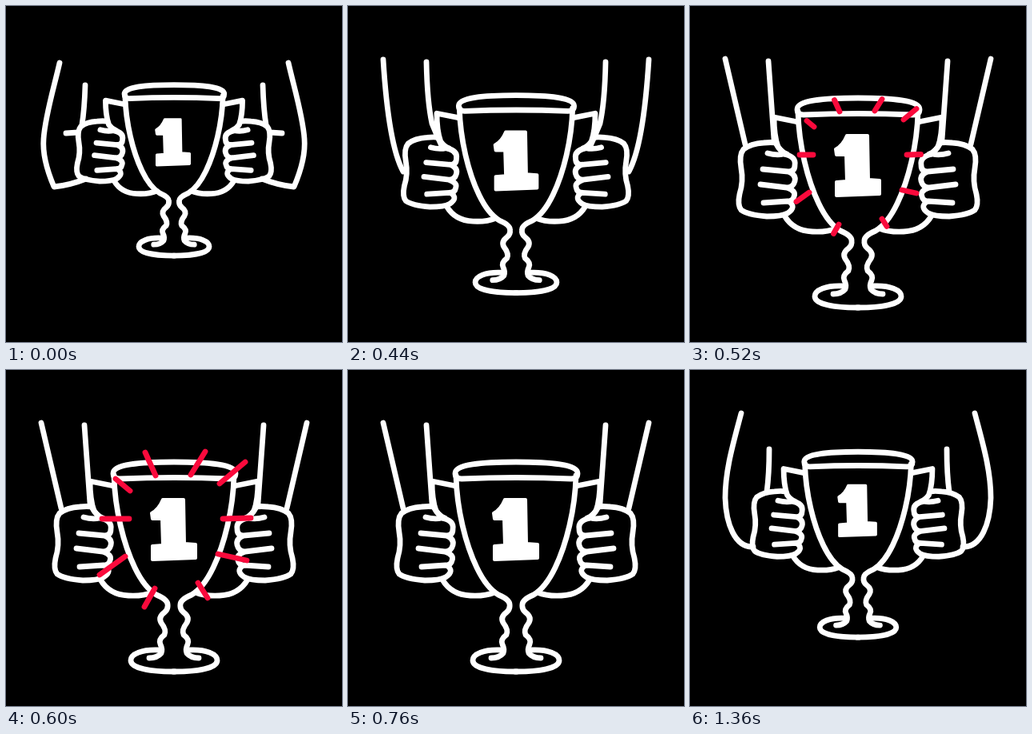
An HTML page for the animation above (1.4 s loop, 420 by 420 pixels).

```html
<!DOCTYPE html>
<html lang="en">
<head>
<meta charset="utf-8">
<title>Trophy</title>
<style>
  html, body { margin: 0; width: 100%; height: 100%; overflow: hidden; background: #000; }
  svg { display: block; width: 100%; height: 100%; }
</style>
</head>
<body>
<svg viewBox="0 0 420 420" fill="none" stroke="#fff" stroke-width="6.8" stroke-linecap="round" stroke-linejoin="round">
  <defs>
    <g id="half">
      <!-- bowl, stem and foot -->
      <path d="M135 132C136 174 147 218 161 247Q173 272 188 281Q202 287 202 293Q203 299 198 303Q190 309 194 316Q201 325 198 331Q190 337 193 343Q196 349 194 354Q189 360 179 360"/>
      <path d="M191 350C170 349 156 355 156 363C156 373 181 377 211 377"/>
      <!-- handle -->
      <path d="M135 145L105 139Q105 162 110 176Q115 183 121 185"/>
      <path d="M118 262Q129 281 153 282Q171 283 183 278"/>
      <!-- fist -->
      <path d="M97 184Q108 187 117 185Q133 188 131 199Q131 207 123 207L91 204M123 207Q133 211 131 219Q129 227 121 227L88 223M121 227Q133 231 130 238Q129 244 122 244L92 246M123 244Q134 251 122 259Q115 263 96 263Q72 261 64 255Q59 249 62 235Q67 219 64 203Q61 186 67 179Q76 172 92 171Q102 170 107 171"/>
    </g>
    <path id="arm"/>
  </defs>
  <use href="#arm"/>
  <use href="#arm" transform="matrix(-1 0 0 1 420 0)"/>
  <g id="cup">
    <path d="M134 129C134 118 167 115 210 115C253 115 287 118 287 129Q287 136 279 136Q210 133 142 136Q134 136 134 129Z"/>
    <use href="#half"/>
    <use href="#half" transform="matrix(-1 0 0 1 420 0)"/>
  </g>
  <path id="one" fill="#fff" stroke-width="4" d="M-14 -37L12 -37L13 18L27 19L27 36L-27 38L-27 21L-14 20L-15 -13L-27 -13L-28 -20Q-19 -25 -14 -37Z"/>
  <path id="rays" stroke="#fa0a3c"/>
</svg>
<script>
const LOOP = 1400;
const $ = id => document.getElementById(id);

// y, s: rim height and cup scale; n: centre and scale of the digit
const poses = {
  low: {
    y: 107.5, s: 0.815, n: [209, 170, 0.76],
    arm: 'M67 71C60 102 49 137 47 166Q45 191 60 226Q80 224 100 216M99 99Q98 130 95 148M75 159L90 158'
  },
  rise: {
    y: 112, s: 0.885, n: [209.5, 175.5, 0.84],
    arm: 'M64 54C54 92 44 125 44 160C45 192 56 222 79 221M99 99Q99 130 96 152'
  },
  near: {
    y: 122, s: 0.943, n: [210.5, 193, 0.96],
    arm: 'M44 67C47 115 54 180 69 207M98 70Q99 120 105 147Q111 162 118 177'
  },
  close: {
    y: 126, s: 1, n: [210, 199, 1],
    arm: 'M44 66L69 173M98 69L105 167Q111 180 119 185'
  }
};

// start time, pose, visible part of each ray (from, to)
const steps = [
  [0, 'low'], [400, 'rise'], [440, 'near'], [480, 'close'],
  [520, 'close', 0, 0.5], [600, 'close', 0, 1],
  [640, 'close', 0.4, 1], [680, 'close', 0.75, 1],
  [760, 'close'], [1320, 'near'], [1360, 'rise']
];

// inner end, outer end
const rays = [
  [187, 132, 174, 103], [231, 131, 249, 102], [267, 142, 299, 115],
  [155, 151, 137, 136], [154, 186, 120, 186], [271, 186, 306, 185],
  [265, 230, 301, 238], [240, 266, 252, 285], [186, 273, 173, 296],
  [149, 233, 117, 256]
];

const mix = (a, b, k) => a + (b - a) * k;

function rayPath(from, to) {
  return rays.map(([x, y, u, v]) =>
    `M${mix(x, u, from)} ${mix(y, v, from)}L${mix(x, u, to)} ${mix(y, v, to)}`).join('');
}

let shown;

function draw(time) {
  const step = steps.findLast(([start]) => start <= time);
  if (step === shown) return;
  shown = step;
  const [, name, from = 0, to = 0] = step;
  const { y, s, n, arm } = poses[name];
  $('arm').setAttribute('d', arm);
  $('cup').setAttribute('transform', `translate(210 ${y}) scale(${s}) translate(-210 -126)`);
  $('cup').setAttribute('stroke-width', 6.8 / s);
  $('one').setAttribute('transform', `translate(${n[0]} ${n[1]}) scale(${n[2]})`);
  $('rays').setAttribute('d', to ? rayPath(from, to) : '');
}

const begin = performance.now();

function tick() {
  draw((performance.now() - begin) % LOOP);
  requestAnimationFrame(tick);
}
tick();
</script>
</body>
</html>
```
